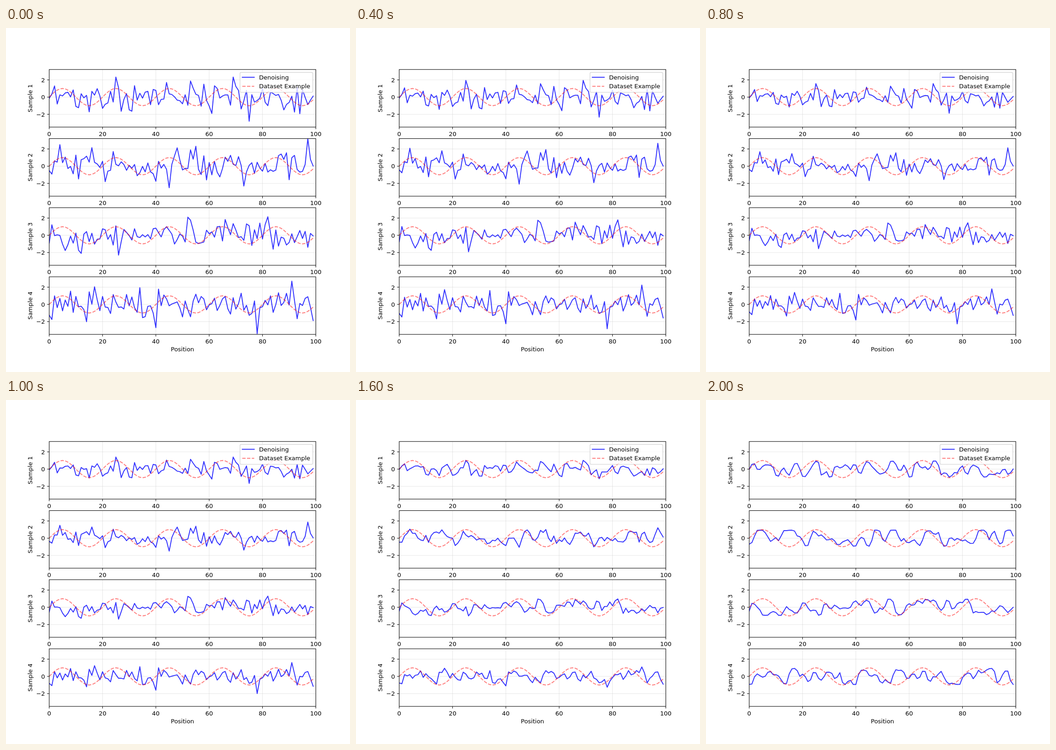
An HTML page that plays this animation: 748 by 748 pixels, repeating every 2.2 s.

```html
<!DOCTYPE html>
<html lang="en">
<head>
<meta charset="utf-8">
<title>Denoising</title>
<style>
  html, body { margin: 0; width: 100%; height: 100%; overflow: hidden; background: #fff; }
  svg { display: block; width: 100%; height: 100%; font: 13.89px "DejaVu Sans", sans-serif; }
  polyline, .key { fill: none; stroke-width: 2.083; stroke-linejoin: round; }
  .signal { stroke: #00f; stroke-opacity: .8; stroke-linecap: square; }
  .example { stroke: #f00; stroke-opacity: .5; stroke-dasharray: 7.71 3.33; }
  .grid { stroke: #b0b0b0; stroke-opacity: .3; stroke-width: 1.11; }
  .axis { fill: none; stroke: #000; stroke-width: 1.11; }
  .box { fill: #fff; fill-opacity: .8; stroke: #ccc; stroke-opacity: .8; stroke-width: 1.39; }
  .mid { text-anchor: middle; }
  .end { text-anchor: end; }
</style>
</head>
<body>
<svg id="chart" viewBox="0 0 800 800"></svg>
<script>
const LEFT = 100.5, RIGHT = 720.5, TOP = 96.5, HEIGHT = 133.91, ROW_STEP = 160.7;
const ZERO = 64.2, UNIT = 20.03, COUNT = 100;
const STEP_MS = 200, STEPS = 11;

// The tallest spikes of each starting signal; seeded noise gives the rest.
const SPIKES = [
  { 25: 2.33, 61: -1.9, 69: 2.33, 75: -2.8 },
  { 4: 2.5, 45: -2.5, 73: -2.3, 97: 3.2 },
  { 12: -2.1, 26: -2.3, 53: 1.75, 82: 2.15 },
  { 17: 2.05, 40: -2.7, 78: -3.4, 91: 2.7 }
];

const chart = document.getElementById("chart");

function add(tag, attrs, text = "", parent = chart) {
  const node = document.createElementNS("http://www.w3.org/2000/svg", tag);
  for (const name in attrs) node.setAttribute(name, attrs[name]);
  node.textContent = text;
  return parent.appendChild(node);
}

const line = (cls, x1, y1, x2, y2) => add("line", { class: cls, x1, y1, x2, y2 });
const label = (cls, x, y, text) => add("text", { class: cls, x, y }, text);
const xAt = x => LEFT + x * 6.2;
const series = valueAt => Array.from({ length: COUNT }, (_, i) => valueAt(i));

function seededRandom(seed) {
  return () => {
    seed = (seed * 1664525 + 1013904223) >>> 0;
    return seed / 4294967296;
  };
}

function makeNoise(spikes, seed) {
  const random = seededRandom(seed);
  return series(i => {
    const bell = (random() + random() + random() - 1.5) * 1.7;
    return spikes[i] ?? bell;
  });
}

// Neighbour smoothing with soft saturation.
function denoise(noise) {
  return noise.map((v, i) => {
    const before = noise[i - 1] ?? v, after = noise[i + 1] ?? v;
    const mean = (before + 2 * v + after) / 4;
    return 0.93 * Math.sin(Math.max(-1.57, Math.min(1.57, 1.35 * mean)));
  });
}

function makeRow(spikes, row) {
  const top = TOP + row * ROW_STEP, bottom = top + HEIGHT;
  const yAt = v => top + ZERO - v * UNIT;
  const toPoints = values =>
    values.map((v, i) => `${xAt(i).toFixed(2)},${yAt(v).toFixed(2)}`).join(" ");
  const frame = { x: LEFT, y: top, width: RIGHT - LEFT, height: HEIGHT };

  add("rect", frame, "", add("clipPath", { id: `clip${row}` }));

  for (let x = 0; x <= 100; x += 20) {
    line("grid", xAt(x), top, xAt(x), bottom);
    line("axis", xAt(x), bottom, xAt(x), bottom + 4.86);
    label("mid", xAt(x), bottom + 20.9, x);
  }
  for (let y = -2; y <= 2; y += 2) {
    line("grid", LEFT, yAt(y), RIGHT, yAt(y));
    line("axis", LEFT - 4.86, yAt(y), LEFT, yAt(y));
    label("end", LEFT - 9.72, yAt(y) + 5.3, String(y).replace("-", "\u2212"));
  }

  const curve = cls => add("polyline", { class: cls, "clip-path": `url(#clip${row})` });
  const signal = curve("signal");
  curve("example").setAttribute("points", toPoints(series(i => Math.sin(i * Math.PI / 10))));

  add("rect", { class: "axis", ...frame });
  add("text", {
    class: "mid", transform: `translate(61.3 ${top + HEIGHT / 2}) rotate(-90)`
  }, `Sample ${row + 1}`);

  const noise = makeNoise(spikes, 71 + row * 1009), clean = denoise(noise);
  return (noiseShare, cleanShare) => signal.setAttribute("points",
    toPoints(noise.map((v, i) => noiseShare * v + cleanShare * clean[i])));
}

function makeLegend() {
  add("rect", { class: "box", x: 544.2, y: 103.2, width: 169.1, height: 46.5, rx: 2.78 });
  [["signal", "Denoising"], ["example", "Dataset Example"]].forEach(([cls, text], i) => {
    const y = 114.6 + i * 21;
    line(`key ${cls}`, 549.5, y, 577.3, y);
    label("", 588.6, y + 4.86, text);
  });
}

const rows = SPIKES.map(makeRow);
label("mid", (LEFT + RIGHT) / 2, 752, "Position");
makeLegend();

let shown = -1;
function draw(now) {
  const step = Math.floor(now / STEP_MS) % STEPS;
  if (step !== shown) {
    shown = step;
    const p = step / (STEPS - 1);
    const noiseShare = 1 - p + 0.05 * Math.sin(Math.PI * p);
    rows.forEach(update => update(noiseShare, p ** 3));
  }
  requestAnimationFrame(draw);
}
draw(0);
</script>
</body>
</html>
```
